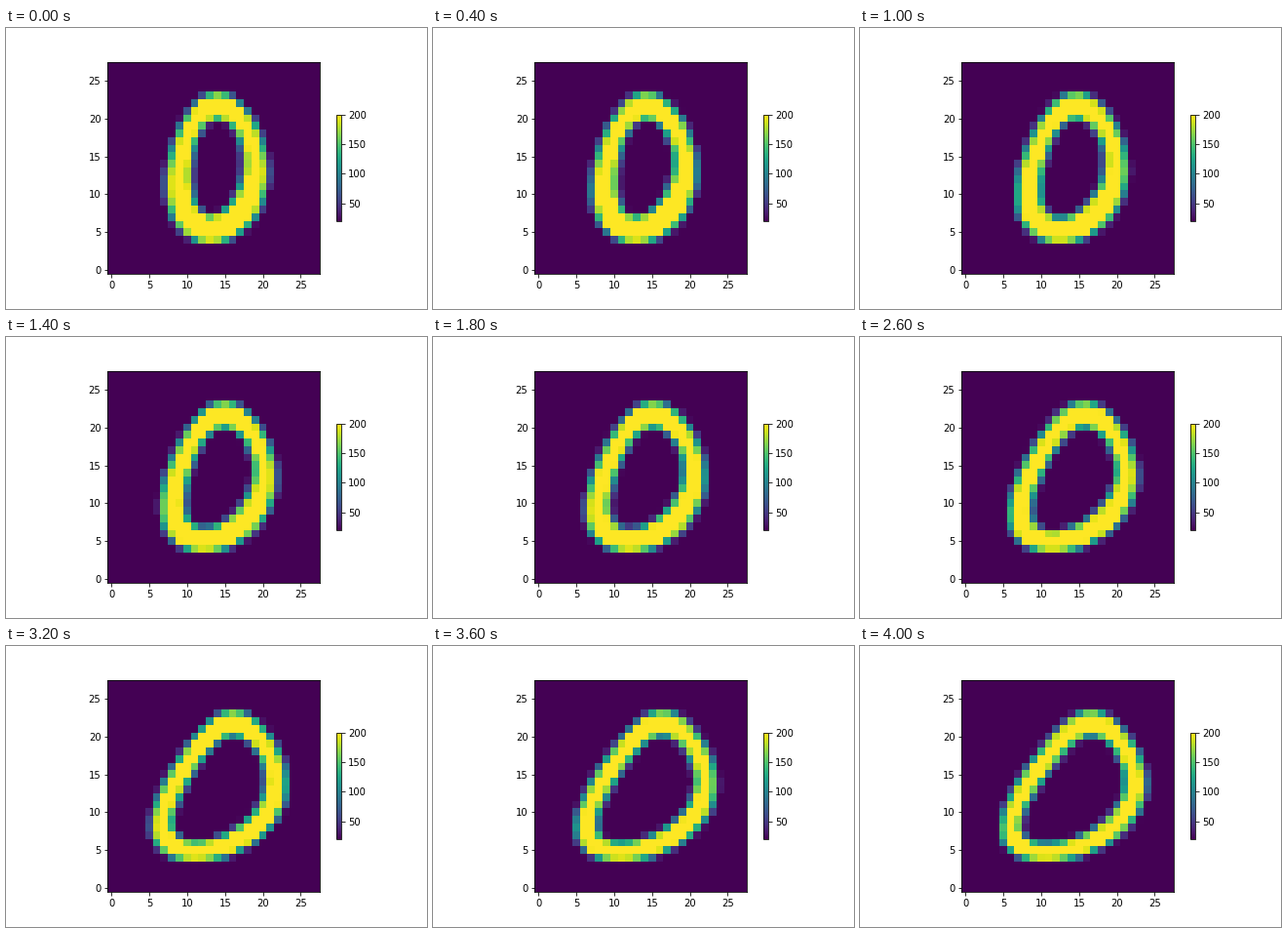
Animation, 432 px wide and 288 px high, one loop 4.2 s. Source, as a matplotlib script:

```python
import numpy as np
import matplotlib.pyplot as plt
from matplotlib.animation import FuncAnimation

FRAMES, INTERVAL = 21, 200
SIZE, SUB = 28, 8  # grid cells per side, samples per cell

samples = (np.arange(SIZE * SUB) + 0.5) / SUB - 0.5
x, y = np.meshgrid(samples, samples)


def averaging(width):
    """Weights that average the samples in a window around each cell."""
    window = abs(samples - np.arange(SIZE)[:, None]) < width / 2
    return window / window.sum(axis=1, keepdims=True)


blur_x, blur_y = averaging(1.9), averaging(1.5)


def egg(t, bottom, top, half_width, taper):
    """Egg on a bowed, leaning spine; t goes from upright to slanted."""
    u = (2 * y - top - bottom) / (top - bottom)
    spine = (14.05 + 1.15 * t) + (0.45 + 2.55 * t) * u - (0.5 + 1.1 * t) * u**2
    reach = half_width * np.sqrt(np.clip(1 - u**2, 0, None)) * (1 - taper * u)
    return abs(x - spine) < reach


def digit(t):
    outer = egg(t, 3.6, 23.3, 6.4 + 2.0 * t, 0.15 + 0.17 * t)
    inner = egg(t, 7.1 - 1.3 * t, 20.0 + 0.3 * t, 3.6 + 2.3 * t, 0.3 * t)
    return 255 * blur_y @ (outer & ~inner) @ blur_x.T


plt.rcParams.update({"font.family": "DejaVu Sans", "font.size": 10})
fig, ax = plt.subplots(figsize=(6, 4), dpi=72, facecolor="white")
fig.subplots_adjust(left=0.125, right=0.9, bottom=0.125, top=0.88)
image = ax.imshow(digit(0), origin="lower", cmap="viridis",
                  interpolation="nearest", vmin=20, vmax=200)
ax.set_xticks(range(0, SIZE, 5))
ax.set_yticks(range(0, SIZE, 5))
fig.colorbar(image, shrink=0.5, ticks=[50, 100, 150, 200])


def update(i):
    image.set_data(digit(i / (FRAMES - 1)))
    return [image]


anim = FuncAnimation(fig, update, frames=FRAMES, interval=INTERVAL,
                     repeat=True, repeat_delay=0)
plt.show()
```
